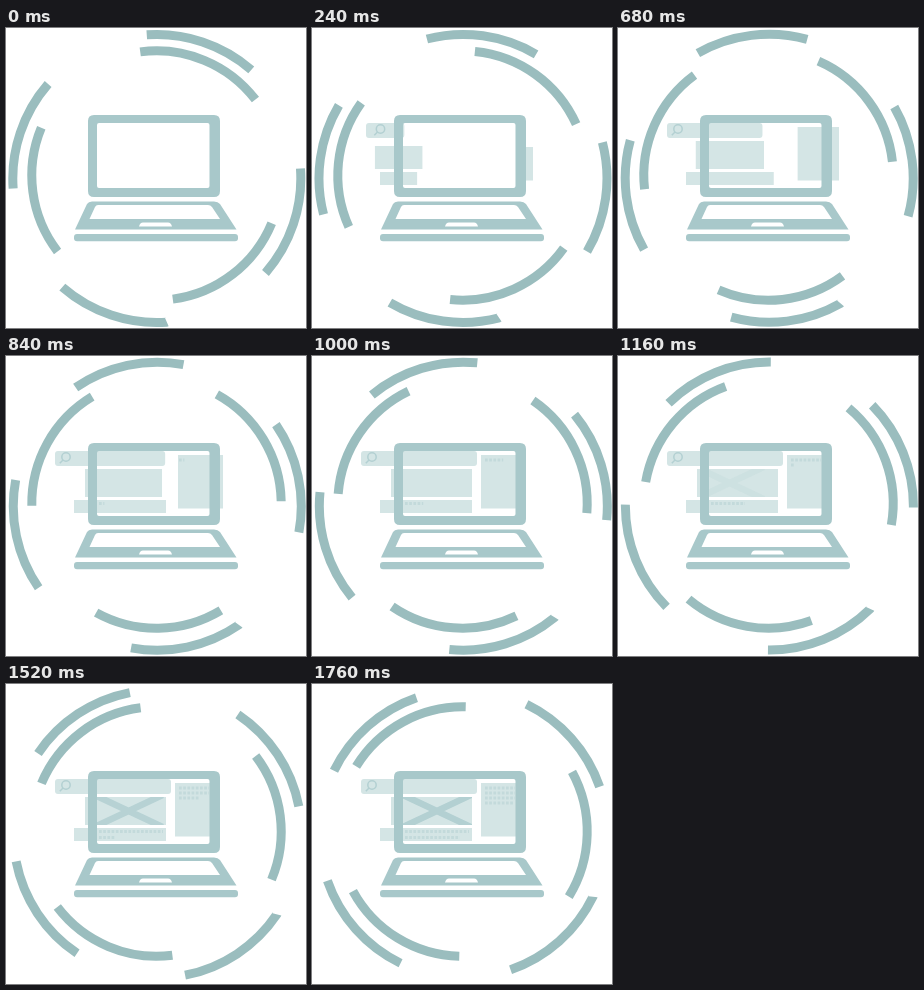
An HTML page for the animation above (1840 ms loop, 300 px wide and 300 px high).

```html
<!DOCTYPE html>
<html lang="en">
<head>
<meta charset="utf-8">
<title>Laptop assembling a page</title>
<style>
  html, body { margin: 0; width: 100%; height: 100%; overflow: hidden; background: #fff; }
  svg { display: block; width: 100%; height: 100%; }
  .ring { fill: none; stroke: #9abdbe; stroke-width: 9; }
  .solid { fill: #a8c8ca; }
  .pale { fill: #d4e5e5; }
  .mark { fill: none; stroke: #b3d0d2; }
  .copy { fill: none; stroke: #c3dadb; stroke-width: 3; stroke-dasharray: 2.7 1.5; }
</style>
</head>
<body>
<svg viewBox="0 0 300 300">
  <clipPath id="frame"><rect x="82" y="113" width="78" height="28"/></clipPath>
  <circle id="outer" class="ring" cx="150.8" cy="150.5" r="144" pathLength="360" stroke-dasharray="45"/>
  <circle id="inner" class="ring" cx="150.5" cy="147.5" r="124.7" pathLength="360" stroke-dasharray="60"/>
  <g id="page">
    <rect id="search" class="pale" rx="3"/>
    <g id="lens" class="mark" stroke-width="1.5">
      <circle r="4.2"/>
      <path d="M-3 3L-6.2 6.2"/>
    </g>
    <rect id="picture" class="pale"/>
    <g clip-path="url(#frame)">
      <path id="cross" class="mark" stroke-width="6.5" d="M-34 -16L34 16M-34 16L34 -16"/>
    </g>
    <rect id="caption" class="pale"/>
    <path id="captionCopy" class="copy"/>
    <rect id="sidebar" class="pale"/>
    <path id="sidebarCopy" class="copy"/>
  </g>
  <g class="solid" fill-rule="evenodd">
    <path d="M88 87H208Q214 87 214 93V163Q214 169 208 169H88Q82 169 82 163V93Q82 87 88 87Z
             M93 95Q91 95 91 97V158Q91 160 93 160H201.500Q203.500 160 203.500 158V97Q203.500 95 201.500 95Z"/>
    <path d="M86 173.500H208Q212 173.500 214 176L230.500 201.500H69L81 176Q82.500 173.500 86 173.500Z
             M92 177Q90 177 89 179L83.500 191H214L206 179Q204.500 177 202 177Z
             M137 194.500Q134 194.500 133 198.500H166Q165 194.500 162 194.500Z"/>
    <rect x="68" y="206" width="164" height="7.300" rx="3"/>
  </g>
</svg>
<script>
const LOOP = 1840, STEP = 40, LAST = 44;
const $ = id => document.getElementById(id);
const clamp = x => Math.min(1, Math.max(0, x));
const smooth = x => (x = clamp(x), x * x * (3 - 2 * x));
const mix = (a, b, t) => a + (b - a) * t;

function set(id, attrs) {
  for (const name in attrs) $(id).setAttribute(name, attrs[name]);
}

function box(id, left, top, right, bottom) {
  set(id, { x: left, y: top, width: right - left, height: bottom - top });
}

// Fills rows of text marks one after another up to a total length.
function copy(id, x, y, width, gap, rows, length) {
  let d = '';
  for (let i = 0; i < rows; i++) {
    const part = Math.min(width, length - i * width);
    if (part > 0) d += `M${x} ${y + i * gap}h${part.toFixed(2)}`;
  }
  set(id, { d });
}

// Degrees turned: a quick start of ten steps, then a slower, slightly rising pace.
function turn(s, quick, slow) {
  const rest = Math.max(0, s - 10);
  return quick * Math.min(s, 10) + rest * (slow + .003 * rest);
}

function draw(ms) {
  const s = Math.min(LAST, Math.floor(ms % LOOP / STEP));

  // The outer ring turns about a point slightly off its own centre.
  set('outer', { transform: `rotate(${-turn(s, 1.75, 1.15)} 150.5 149.5) rotate(-94 150.8 150.5)` });
  set('inner', { transform: `rotate(${turn(s, 2.2, 1.28) - 97.5} 150.5 147.5)` });

  const settle = Math.max(0, 12.5 - 1.25 * s);
  const grow = smooth(s / 25), growFast = smooth(s / 20);
  set('page', { opacity: clamp(s / 5) });

  box('search', 49 + settle, 95, mix(80, 165, grow), 110);
  set('lens', { transform: `translate(${60 + 1.7 * settle} 101)` });
  box('picture', mix(58.5, 79, growFast), 113 + settle, mix(102, 160, grow), 141);
  box('caption', 68, 144, mix(90, 160, growFast), 157);
  const side = mix(213, 169, grow);
  box('sidebar', side, 99 + 4 * settle, Math.min(221, side + 45), 152.5);

  const reveal = clamp((s - 26) / 14);
  set('cross', { transform: `translate(${mix(108, 125, reveal)} 127)`, opacity: reveal });

  const typing = Math.max(0, s - 19), typed = typing * (2.5 + .09 * typing);
  copy('captionCopy', 93, 147.5, 64, 6, 2, typed);
  copy('sidebarCopy', 173, 104, 30, 5, 4, typed);
}

const began = performance.now();
function tick() {
  draw(performance.now() - began);
  requestAnimationFrame(tick);
}
tick();
</script>
</body>
</html>
```
